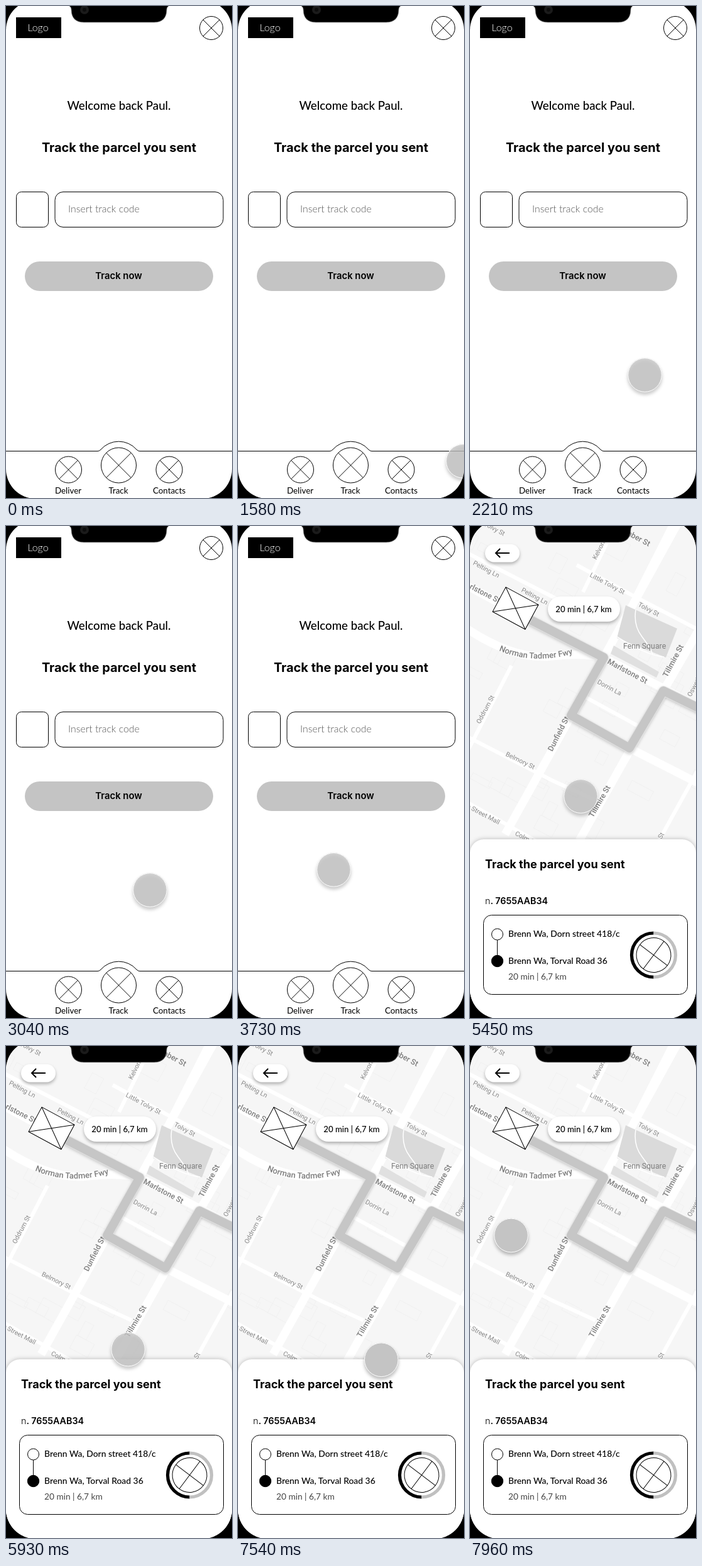
These frames come from a looping animation (360 px wide and 782 px high, 8000 ms). An HTML page:

```html
<!DOCTYPE html>
<html lang="en">
<head>
<meta charset="utf-8">
<title>Parcel tracking</title>
<style>
  html, body { margin: 0; width: 100%; height: 100%; overflow: hidden; background: #000; }
  svg { display: block; width: 100%; height: 100%; }
  .ui { font-family: Lato, sans-serif; }
  .head { font-family: Inter, sans-serif; font-weight: 700; }
  .map text { font-family: Roboto, sans-serif; font-size: 10.4px; fill: #8a8a8a; }
  .map .big { font-size: 12.3px; font-weight: 500; fill: #7e7e7e; }
  .map .fwy { font-size: 13px; }
  .map .place { font-size: 12.3px; fill: #7e7e7e; }
  .line { fill: none; stroke: #000; }
  .road { fill: none; stroke: #fff; }
  .mid { text-anchor: middle; }
  .lift { filter: drop-shadow(0 3px 2.5px rgba(0, 0, 0, .28)); }
</style>
</head>
<body>
<svg viewBox="0 0 360 782">
  <defs>
    <clipPath id="screen"><rect y="-9" width="360" height="792" rx="47"/></clipPath>
    <path id="fwy" d="M46 198Q102 222 172 201"/>
    <path id="route" d="M92 147L213 209L161 301L254 353L308 262L370 292"/>
  </defs>
  <rect width="360" height="782"/>
  <g clip-path="url(#screen)">
    <g id="home" class="ui">
      <rect width="360" height="782" fill="#fff"/>
      <rect x="16" y="18" width="72" height="33"/>
      <text class="mid" x="51" y="40" font-size="16" font-weight="300" fill="#fff">Logo</text>
      <text class="mid" x="180" y="165" font-size="18.7" font-weight="500">Welcome back Paul.</text>
      <text class="head mid" x="180" y="232" font-size="20">Track the parcel you sent</text>
      <g class="line">
        <rect x="16.5" y="295.5" width="51" height="56" rx="8"/>
        <rect x="78" y="295.5" width="268" height="56" rx="13"/>
        <path d="M0 707.5H146Q149 707.5 151 705A38 38 0 0 1 208 705Q210 707.5 213 707.5H360"/>
      </g>
      <text x="99" y="328" font-size="15.8" font-weight="300" fill="#555">Insert track code</text>
      <rect x="30" y="406" width="300" height="47" rx="23.5" fill="#c4c4c4"/>
      <text class="mid" x="179.5" y="434" font-family="Inter, sans-serif" font-size="14.9" font-weight="600">Track now</text>
      <g id="icons" class="line"></g>
      <g class="mid" font-size="13.4">
        <text x="99" y="775">Deliver</text>
        <text x="179" y="775">Track</text>
        <text x="260" y="775">Contacts</text>
      </g>
    </g>

    <g id="trip" class="ui">
      <rect width="360" height="782" fill="#f6f6f6"/>
      <g class="map">
        <g id="blocks" fill="none" stroke="#f1f1f1"></g>
        <g class="road" stroke-width="6">
          <path d="M170 62L262 112L362 164M180 105L234 -6M-6 362L66 222M-6 334L130 404L200 436M-10 436L118 508M-6 42L150 122M262 112L322 -6M270 360L362 406M362 390L290 520M213 209L180 270L268 318"/>
        </g>
        <g class="road" stroke-width="13">
          <path d="M-10 92L98 150L310 259L362 286M334 -10L213 209L56 490M364 166L308 262L174 500M-10 160Q70 214 130 207T214 212M161 300L254 353L362 408"/>
        </g>
        <path fill="#dadada" d="M248 126L330 163L312 209L234 178Z"/>
        <path fill="#e0e0e0" d="M229 190L301 232L297 241L224 203Z"/>
        <path class="road" stroke-width="1.5" d="M264 133Q260 158 274 176T291 204M234 176Q280 205 309 208"/>
        <g id="labels"></g>
        <text class="big fwy"><textPath href="#fwy">Norman Tadmer Fwy</textPath></text>
        <g fill="none" stroke-linejoin="round" style="filter:drop-shadow(0 2px 2px rgba(0,0,0,.18))">
          <use href="#route" stroke="#e4e4e4" stroke-width="15.5"/>
          <use href="#route" stroke="#c6c6c6" stroke-width="13.8"/>
        </g>
      </g>
      <g class="line" transform="translate(72.5 130.7) rotate(28.3)">
        <rect x="-29.5" y="-22.2" width="59" height="44.4" fill="#fff"/>
        <path d="M-29.5 -22.2L29.5 22.2M29.5 -22.2L-29.5 22.2"/>
      </g>
      <rect class="lift" x="124" y="112" width="115" height="40" rx="20" fill="#fff"/>
      <text class="mid" x="181" y="136.5" font-size="13.2" font-weight="500">20 min | 6,7 km</text>
      <rect class="lift" x="24" y="29" width="55" height="28.5" rx="14.2" fill="#fff"/>
      <path class="line" stroke-width="2" d="M63 43H41M48 36L41 43L48 50"/>

      <rect y="498" width="360" height="310" rx="22" fill="#fff" style="filter:drop-shadow(0 -1px 3px rgba(0,0,0,.2))"/>
      <text class="head" x="24" y="544" font-size="18.1">Track the parcel you sent</text>
      <text x="24" y="601" font-family="Inter, sans-serif" font-size="14.3" font-weight="600"><tspan font-weight="300">n</tspan>. 7655AAB34</text>
      <g class="line">
        <rect x="21.5" y="618.5" width="325" height="126" rx="13"/>
        <path d="M43.5 658V684"/>
        <circle cx="43.5" cy="649" r="9"/>
        <circle cx="43.5" cy="691.5" r="9.2" fill="#000"/>
      </g>
      <g class="line" transform="translate(292.5 682)">
        <g id="courier" transform="rotate(-8)"></g>
        <g stroke-width="5.2">
          <path d="M0 -35A35 35 0 0 0 0 35"/>
          <path stroke="#c0c0c0" d="M0 -35A35 35 0 0 1 0 35"/>
        </g>
      </g>
      <g font-size="13.9" font-weight="500">
        <text x="61" y="653">Brenn Wa, Dorn street 418/c</text>
        <text x="61" y="696">Brenn Wa, Torval Road 36</text>
        <text x="61" y="721" font-size="13.7" font-weight="400" fill="#444">20 min | 6,7 km</text>
      </g>
    </g>

    <g id="touch" style="filter:drop-shadow(0 4px 2.5px rgba(0,0,0,.25))">
      <circle id="dot" r="27.3" fill="#c4c4c4"/>
      <circle r="26.8" fill="none" stroke="#fff"/>
    </g>
  </g>
  <path stroke="#999" stroke-width=".8" d="M99 -1Q104 1 104 6C104 19 111 26 124 26H236C249 26 256 19 256 6Q256 1 261 -1Z"/>
  <circle cx="125" cy="6" r="7" fill="#1b1b1b"/>
  <circle cx="125" cy="6" r="3" fill="#0c0c0c"/>
</svg>
<script>
const $ = id => document.getElementById(id);
const LOOP = 8000;

const crossed = (x, y, r) => {
  const d = r * 0.707;
  return `<circle cx="${x}" cy="${y}" r="${r}"/>` +
    `<path d="M${x - d} ${y - d}l${2 * d} ${2 * d}M${x + d} ${y - d}l${-2 * d} ${2 * d}"/>`;
};
$('icons').innerHTML = crossed(327, 35, 18.5) + crossed(99.5, 737, 21) +
  crossed(179.5, 730, 28) + crossed(260, 737, 21);
$('courier').innerHTML = crossed(0, 0, 27.5);

// text, x, y, angle, class
const labels = [
  ['Pelting Ln', 4, 61, 28], ['Pelting Ln', 81, 104, 28],
  ['Marlstone St', -17, 91, 27, 'big'], ['Marlstone St', 218, 218, 28, 'big'],
  ['Kelvora St', 201, 54, -63], ['Tanber St', 238, 8, 28, 'big'],
  ['Little Tolvy St', -1, -13, 28], ['Little Tolvy St', 190, 80, 28], ['Tolvy St', 267, 127, 28],
  ['Fenn Square', 244, 195, 0, 'place'], ['Tillmire St', 314, 241, -62, 'big'],
  ['Tillmire St', 196, 464, -60, 'big'], ['Dorrin La', 202, 250, 28],
  ['Oddrum St', 16, 315, -62], ['Belmory St', 56, 365, 26],
  ['Dunfield St', 131, 359, -63, 'big'], ['Osweth St', 352, 272, -62],
  ['Brun Street Mall', -20, 440, 28], ['Colm St', 71, 491, 27], ['St', 305, 498, -60]
];
$('labels').innerHTML = labels.map(([s, x, y, a, cls = '']) =>
  `<text class="${cls}" transform="translate(${x} ${y}) rotate(${a})">${s}</text>`).join('');

// Faint building outlines
let seed = 11;
const rnd = () => (seed = seed * 16807 % 2147483647) / 2147483647;
$('blocks').innerHTML = Array.from({ length: 45 }, () =>
  `<rect transform="translate(${rnd() * 360} ${rnd() * 500}) rotate(28)" width="${15 + rnd() * 25}" height="${10 + rnd() * 24}"/>`).join('');

// Touch path: time, x, y
const path = [
  [1300, 394, 812], [1370, 390, 800], [1720, 338, 679], [2210, 278.5, 586.5], [2550, 278.5, 586.5],
  [3370, 183, 568], [3730, 152.5, 546.5], [4220, 172, 455], [4570, 176.5, 429.5],
  [5590, 176.5, 429.5], [5930, 194.5, 482], [6210, 239, 501],
  [7200, 239, 501], [7540, 228.5, 499], [7960, 65.5, 301], [8000, 65.5, 301]
];

const slope = (i, c) => {
  const a = path[i - 1], b = path[i], d = path[i + 1];
  if (!a || !d || (b[c] - a[c]) * (d[c] - b[c]) <= 0) return 0;
  return (d[c] - a[c]) / (d[0] - a[0]);
};

function along(t, c) {
  let i = 0;
  while (i < path.length - 2 && t >= path[i + 1][0]) i++;
  const p = path[i], q = path[i + 1], h = q[0] - p[0];
  const u = Math.min(1, Math.max(0, (t - p[0]) / h)), v = 1 - u;
  return p[c] * v * v * (1 + 2 * u) + q[c] * u * u * (3 - 2 * u) +
    h * u * v * (slope(i, c) * v - slope(i + 1, c) * u);
}

const ramp = (t, a, b) => Math.min(1, Math.max(0, (t - a) / (b - a)));

function draw(t) {
  const fade = 1 - (1 - ramp(t, 5270, 5450)) ** 2;
  $('trip').style.opacity = t < 5310 ? 0 : fade;
  $('touch').setAttribute('transform', `translate(${along(t, 1)} ${along(t, 2)})`);
  $('touch').style.display = t < 1440 ? 'none' : '';
  $('dot').style.fillOpacity = 0.76 + 0.24 * ramp(t, 6810, 7070);
}

const start = performance.now();
function tick() {
  draw((performance.now() - start) % LOOP);
  requestAnimationFrame(tick);
}
draw(0);
requestAnimationFrame(tick);
</script>
</body>
</html>
```
